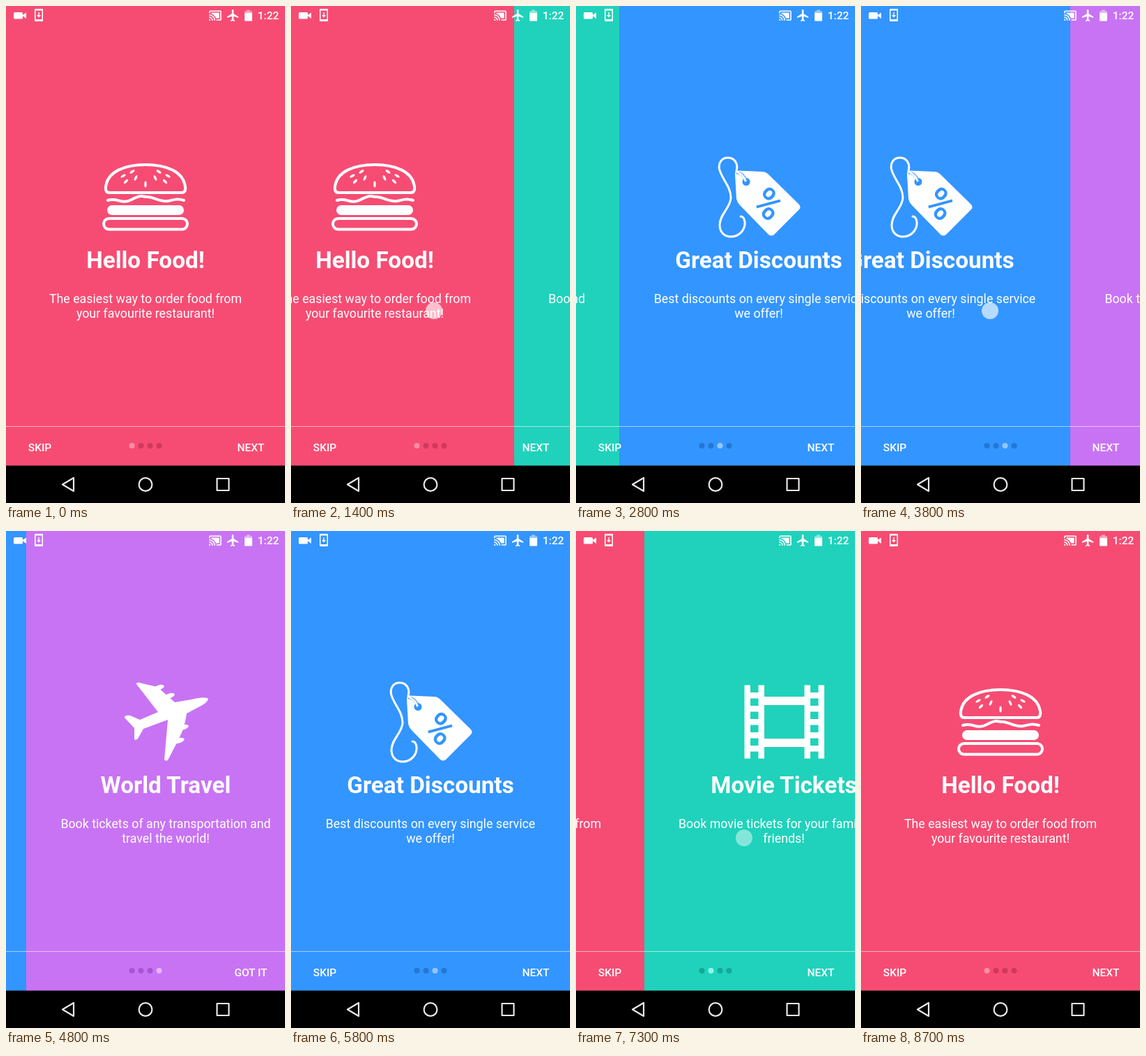
Animation of 400 by 711 pixels, one loop 8800 ms. Source, as an HTML page:

```html
<!DOCTYPE html>
<html lang="en">
<head>
<meta charset="utf-8">
<title>Intro slider</title>
<style>
html, body { margin: 0; height: 100%; overflow: hidden; background: #000; }
svg { display: block; width: 100%; height: 100%; font-family: Roboto, sans-serif; fill: #fff; text-anchor: middle; }
.title { font-size: 33.3px; font-weight: 700; }
.desc { font-size: 17.8px; }
.button { font-size: 15.5px; font-weight: 500; }
.line { fill: none; stroke: #fff; stroke-width: 4; stroke-linecap: round; stroke-linejoin: round; }
.nav { fill: none; stroke: #e8e8e8; stroke-width: 2.2; stroke-linejoin: round; }
</style>
</head>
<body>
<svg viewBox="0 0 400 711">
  <g id="pages"></g>
  <circle id="touch" r="12" fill="#fff"/>
  <rect y="601" width="400" height="1" opacity=".55"/>
  <g id="dots"></g>
  <text id="skip" class="button" x="48.5" y="637">SKIP</text>
  <text id="next" class="button" x="351" y="637">NEXT</text>

  <rect x="11" y="9" width="13" height="9.5" rx="1.5"/>
  <path d="M23 13.5l6-4v8.5z"/>
  <path d="M42 4h10q1 0 1 1v16q0 1-1 1h-10q-1 0-1-1v-16q0-1 1-1zM42.5 6.500v12.500h9v-12.500z" fill-rule="evenodd"/>
  <path d="M46.300 9h1.400v4h2.300l-3 3.500-3-3.500h2.300z"/>
  <path transform="translate(290.400 4)scale(.8)" d="M21 3H3c-1.100 0-2 .9-2 2v3h2V5h18v14h-7v2h7c1.100 0 2-.9 2-2V5c0-1.100-.9-2-2-2zM1 18v3h3c0-1.660-1.340-3-3-3zm0-4v2c2.760 0 5 2.240 5 5h2c0-3.870-3.130-7-7-7zm0-4v2c4.970 0 9 4.030 9 9h2c0-6.080-4.930-11-11-11zM19 7H5v1.630c3.960 1.280 7.090 4.410 8.370 8.370H19z"/>
  <path transform="translate(315.300 3.300)scale(.85)" d="M21 16v-2l-8-5V3.500c0-.83-.67-1.500-1.500-1.500S10 2.670 10 3.500V9l-8 5v2l8-2.500V19l-2 1.500V22l3.500-1 3.500 1v-1.500L13 19v-5.500l8 2.500z"/>
  <path d="M342 10v-2.500h3v-2h5v2h3v2.500z" opacity=".5"/>
  <path d="M342 10h11v10.500q0 1-1 1h-9q-1 0-1-1z"/>
  <text class="button" x="376" y="19">1:22</text>

  <rect y="657.500" width="400" height="54" fill="#000"/>
  <g class="nav">
    <path d="M81 684.500L97 675V694Z"/>
    <circle cx="200" cy="684.500" r="9.400"/>
    <rect x="302.500" y="676" width="17" height="17"/>
  </g>
</svg>
<script>
const $ = id => document.getElementById(id);
const rect = (x, y, w, h, rx = 0) => `<rect x="${x}" y="${y}" width="${w}" height="${h}" rx="${rx}"/>`;
const oval = (x, y, rx, ry, turn) =>
  `<ellipse rx="${rx}" ry="${ry}" transform="translate(${x} ${y})rotate(${turn})"/>`;

const seeds = [[168, 243, -30], [181, 237, -35], [172, 251, -45], [186, 246, -65]];
const burger = `<g class="line">
  <path d="M148 267C143 267 142 262 143.500 256C147 237 170 227 200 227S253 237 256.500 256C258 262 257 267 252 267Z"/>
  <path d="M146 278C160 273 165 285 180 277S195 273 203 273S222 281 232 279S245 275 255 278"/>
  ${rect(140, 304, 120, 15.5, 7.7)}</g>${rect(145, 285, 110, 14, 7)}${oval(200, 255, 1.7, 4.5, 0)}` +
  seeds.map(([x, y, a]) => oval(x, y, 4, 1.7, a) + oval(400 - x, y, 4, 1.7, -a)).join('');

const strip = x => rect(x, 220.5, 8.5, 105) + rect(x + 20, 220.5, 8.5, 105) +
  [0, 1, 2, 3, 4].map(i => rect(x + 8, 231 + 19 * i, 12.5, 8.5)).join('');
const film = strip(143.5) + strip(229.5) + rect(171, 237, 59, 12) + rect(171, 297, 59, 12);

const tag = `<path d="M170 235.500L205 237Q210 237 214 241L258 284Q261 288 258 291L222 327Q218 330 214 327L173 285Q169 281 168 276L166 240Q166 235.500 170 235.500Z"/>
  <g fill="#3395ff"><circle cx="182" cy="251.500" r="5.500"/>
  <text transform="translate(214 283)rotate(43)" y="19" font-size="54" font-weight="500">%</text></g>
  <path d="M168 238Q177 239 182 250" fill="none" stroke="#3395ff" stroke-width="4"/>
  <path class="line" style="stroke-width:3" d="M181 250C178 240 171 240 168 236C171 225 165 217 156 217C147 217 142 224 143.500 233C146 246 160 258 160 274C160 288 144 298 144 313C144 324 151 330 160 330C172 330 181 320 180 309Q179 301 174 301"/>`;

const plane = `<path d="M261 240Q260 246 247 252L230 261Q227 283 218 299L204 326Q201 331 198 327L203 270L168 283L160 297Q157 300 155 298L155 282L141 267Q141 263 149 264L163 270L189 259L158 219Q158 215 166 218L188 223L213 245L237 241Q257 236 261 240Z"/>` +
  [[190, 224], [205, 236], [225, 281], [219, 300]].map(([x, y]) => oval(x, y, 8, 3.5, -18)).join('');

// background, active dot, inactive dot, title, description, icon
const pages = [
  ['#f64c73', '#f98da5', '#d1395c', 'Hello Food!', ['The easiest way to order food from', 'your favourite restaurant!'], burger],
  ['#20d2bb', '#8cf9eb', '#14a895', 'Movie Tickets', ['Book movie tickets for your family and', 'friends!'], film],
  ['#3395ff', '#93c6fd', '#2278d4', 'Great Discounts', ['Best discounts on every single service', 'we offer!'], tag],
  ['#c873f4', '#e4b5fc', '#a854d4', 'World Travel', ['Book tickets of any transportation and', 'travel the world!'], plane],
];
$('pages').innerHTML = pages.map(([color, , , title, lines, icon], i) => `<g transform="translate(${i * 400})">
  <rect width="400" height="658" fill="${color}"/>${icon}
  <text class="title" x="200" y="375">${title}</text>
  ${lines.map((s, n) => `<text class="desc" x="200" y="${425 + 21 * n}">${s}</text>`).join('')}</g>`).join('');
$('dots').innerHTML = pages.map((_, i) => `<circle cx="${180.5 + 13 * i}" cy="629" r="4"/>`).join('');

// start, release, end, dragged part of a page, from page, to page, finger x
const swipes = [
  [1200, 1600, 2000, .4, 0, 1, 285],
  [2500, 2700, 3100, .35, 1, 2, 285],
  [3600, 3900, 4500, .375, 2, 3, 285],
  [4500, 4800, 5200, .0725, 3, 2, 143],
  [5800, 6000, 6300, .25, 2, 1, 143],
  [6900, 7400, 7650, .306, 1, 0, 143],
];

function draw(time) {
  const t = Math.floor(time % 8800 / 100) * 100;
  let pos = 0, finger = null;
  for (const [start, release, end, drag, from, to, x] of swipes) {
    if (t < start) break;
    let part = drag * (t - start) / (release - start);
    if (t > start && t < release) finger = x + (from - to) * part * 400;
    if (t >= release) {
      const u = Math.min(1, (t - release) / (end - release));
      part = drag + (1 - drag) * (1 - (1 - u) ** 5);
    }
    pos = from + (to - from) * part;
  }
  const current = Math.round(pos), last = current === 3;
  $('pages').setAttribute('transform', `translate(${Math.round(-pos * 400)})`);
  [...$('dots').children].forEach((dot, i) => dot.setAttribute('fill', pages[current][i === current ? 1 : 2]));
  $('skip').style.display = last ? 'none' : '';
  $('next').textContent = last ? 'GOT IT' : 'NEXT';
  $('touch').setAttribute('opacity', finger === null ? 0 : t >= 7300 ? .45 : .65);
  $('touch').setAttribute('transform', `translate(${finger ?? 0} ${t > 4500 ? 439 : 436})`);
}

const begin = performance.now();
(function tick() {
  draw(performance.now() - begin);
  requestAnimationFrame(tick);
})();
</script>
</body>
</html>
```
